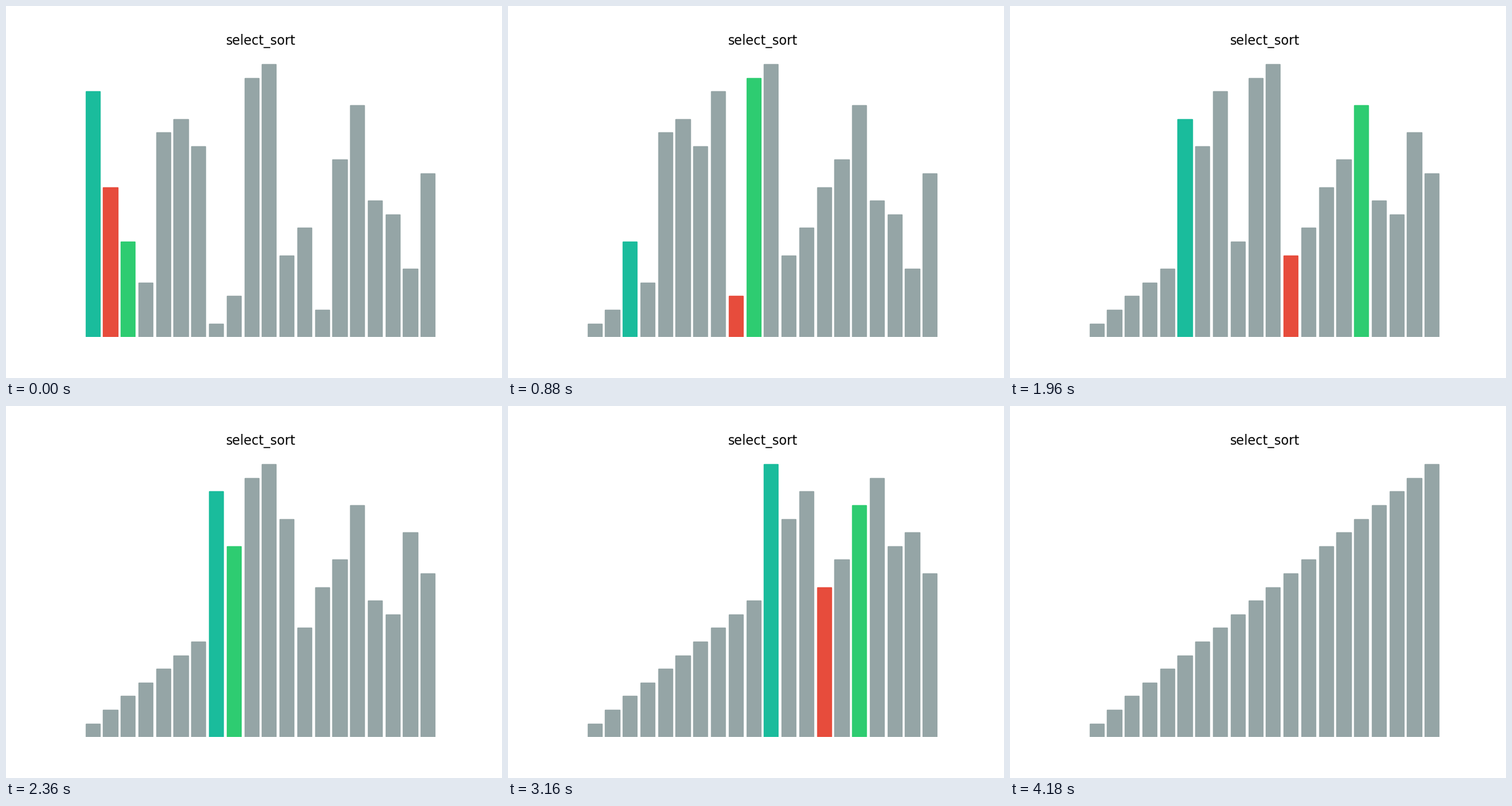
These frames come from a looping animation (640x480 px, 4.2 s). A matplotlib script:

```python
import matplotlib.pyplot as plt
from matplotlib.animation import FuncAnimation

GREY, TEAL, RED, GREEN = "#95a5a6", "#1abc9c", "#e74c3c", "#2ecc71"
VALUES = [18, 11, 7, 4, 15, 16, 14, 1, 3, 19, 20, 6, 8, 2, 13, 17, 10, 9, 5, 12]
N = len(VALUES)


def select_sort(values):
    """Yield (data, current, smallest, probe) for every step of the sort."""
    data = list(values)
    for i in range(N):
        low = i
        for j in range(i + 1, N):
            yield data[:], i, low, j
            if data[j] < data[low]:
                low = j
        data[i], data[low] = data[low], data[i]
        yield data[:], i, low, N - 1
    yield data[:], None, None, None


def pick_color(k, current, smallest, probe):
    if k == current:
        return TEAL
    if k == smallest:
        return RED
    if k == probe:
        return GREEN
    return GREY


# The show opens on the second comparison.
steps = list(select_sort(VALUES))[1:]

fig, ax = plt.subplots(figsize=(6.4, 4.8), dpi=100)
ax.set_title("select_sort")
ax.axis("off")
bars = ax.bar(range(N), VALUES, linewidth=1)


def update(frame):
    data, *marks = steps[frame]
    for k, (bar, value) in enumerate(zip(bars, data)):
        bar.set_height(value)
        bar.set_color(pick_color(k, *marks))
    return bars


anim = FuncAnimation(fig, update, frames=len(steps), interval=20,
                     repeat=True, repeat_delay=0)
plt.show()
```
